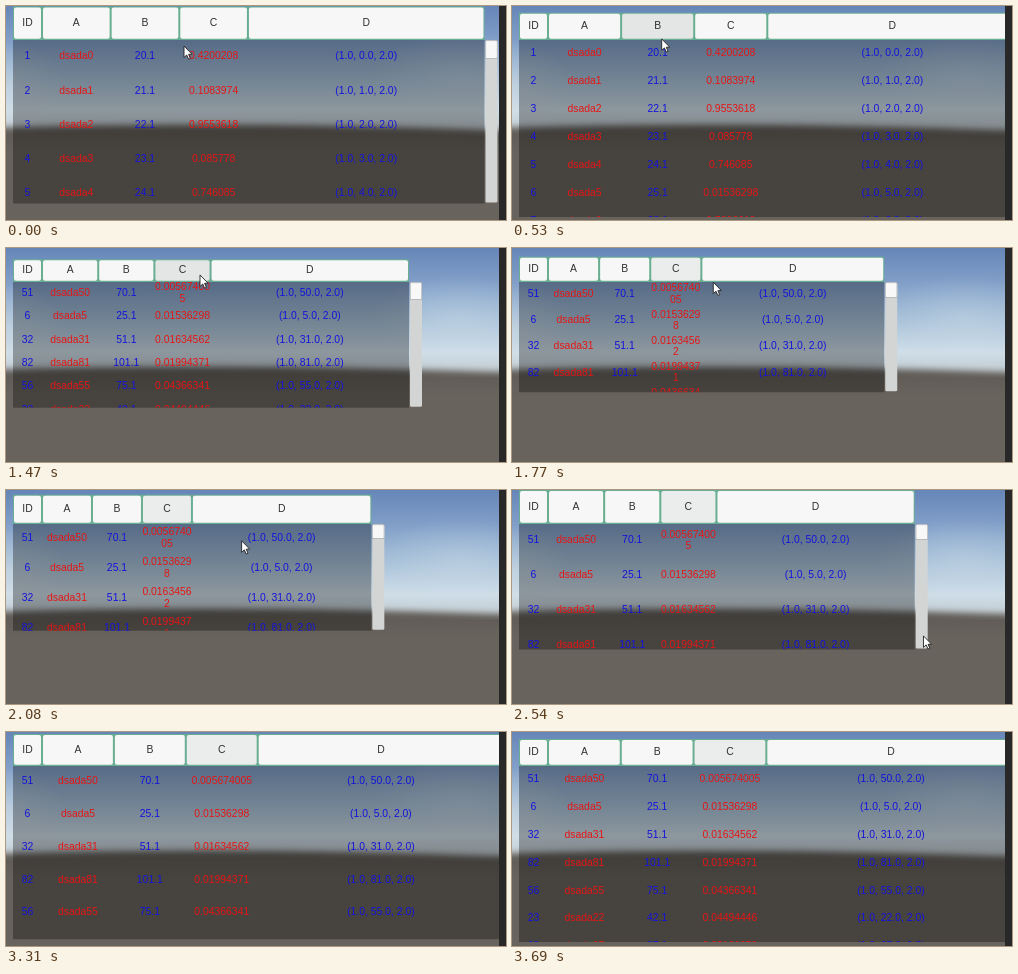
These frames come from a looping animation (500x214 px, 3.84 s). An HTML page with a canvas:

```html
<!DOCTYPE html>
<html>
<head>
<meta charset="utf-8">
<style>
  html, body { margin: 0; width: 100%; height: 100%; overflow: hidden; background: #282828; }
  canvas { display: block; }
</style>
</head>
<body>
<canvas id="stage" width="500" height="214"></canvas>
<script>
const ctx = document.getElementById('stage').getContext('2d');
const LOOP = 3840, STEP = 1000 / 13, LAST_STEP = 48, SORT_AT = 1240;
const LEFT = 7, TOP = 34, VIEW_WIDTH = 493, FONT_SIZE = 10.4;
const RED = '#e51616', BLUE = '#1414dc';
const HEADERS = ['ID', 'A', 'B', 'C', 'D'];

const makeRow = (index, value) => [
  [`${index + 1}`, BLUE],
  [`dsada${index}`, RED],
  [`${20 + index}.1`, BLUE],
  [value, RED],
  [`(1.0, ${index}.0, 2.0)`, BLUE]
];

const unsorted = ['0.4200208', '0.1083974', '0.9553618', '0.085778', '0.746085',
  '0.01536298', '0.7006612', '0.3127409'].map((value, i) => makeRow(i, value));

const sorted = [[50, '0.005674005'], [5, '0.01536298'], [31, '0.01634562'], [81, '0.01994371'],
  [55, '0.04366341'], [22, '0.04494446'], [67, '0.05120873']].map(args => makeRow(...args));

// time, x, y of the pointer tip
const pointerPath = [[0, 178, 40], [530, 149, 33], [1080, 194, 25], [1470, 194, 27], [1800, 202, 35],
  [2080, 236, 51], [2400, 358, 112], [2690, 470, 183], [2920, 483, 193], [3150, 493, 222]];

function pointerAt(ms) {
  const next = pointerPath.findIndex(point => point[0] > ms);
  if (next < 0) return pointerPath.at(-1).slice(1);
  const [t0, x0, y0] = pointerPath[next - 1], [t1, x1, y1] = pointerPath[next];
  const u = (ms - t0) / (t1 - t0);
  return [x0 + (x1 - x0) * u, y0 + (y1 - y0) * u];
}

function fillBox(x, y, w, h, color, radius = 0) {
  ctx.fillStyle = color;
  ctx.beginPath();
  ctx.roundRect(x, y, w, h, radius);
  ctx.fill();
}

function clipTo(x, y, w, h) {
  ctx.save();
  ctx.beginPath();
  ctx.rect(x, y, w, h);
  ctx.clip();
}

function glow(x, y, rx, ry, color) {
  ctx.save();
  ctx.translate(x, y);
  ctx.scale(rx, ry);
  const fade = ctx.createRadialGradient(0, 0, 0, 0, 0, 1);
  fade.addColorStop(0, `rgba(${color},.4)`);
  fade.addColorStop(1, `rgba(${color},0)`);
  fillBox(-1, -1, 2, 2, fade);
  ctx.restore();
}

function drawScenery() {
  const sky = ctx.createLinearGradient(0, 0, 0, 130);
  [[0, '#6686b8'], [.27, '#819fc8'], [.55, '#a6c0d8'], [.8, '#cfdee8'], [1, '#bfc7cb']]
    .forEach(stop => sky.addColorStop(...stop));
  fillBox(0, 0, VIEW_WIDTH, 130, sky);
  glow(455, 72, 90, 45, '205,220,232');
  glow(0, 80, 60, 45, '215,222,228');

  const ground = ctx.createLinearGradient(0, 118, 0, 214);
  ground.addColorStop(0, '#5d5954');
  ground.addColorStop(.3, '#69635d');
  ground.addColorStop(1, '#69635d');
  ctx.save();
  ctx.filter = 'blur(3px)';
  ctx.fillStyle = ground;
  ctx.beginPath();
  ctx.moveTo(-20, 122);
  ctx.quadraticCurveTo(220, 114, 520, 125);
  ctx.lineTo(520, 240);
  ctx.lineTo(-20, 240);
  ctx.fill();
  ctx.restore();
}

function wrap(text, width) {
  const lines = [''];
  for (const char of text) {
    const line = lines.at(-1) + char;
    if (ctx.measureText(line).width > width) lines.push(char);
    else lines[lines.length - 1] = line;
  }
  return lines;
}

function drawPointer(x, y) {
  ctx.beginPath();
  [[0, 0], [0, 11.5], [2.7, 9], [4.6, 13.2], [6.4, 12.4], [4.6, 8.4], [8, 8.2]]
    .forEach(([dx, dy]) => ctx.lineTo(x + dx, y + dy));
  ctx.closePath();
  ctx.fillStyle = '#fff';
  ctx.fill();
  ctx.lineWidth = .9;
  ctx.strokeStyle = '#222';
  ctx.stroke();
}

function draw(ms) {
  const s = ms / 1000;
  const right = 435.5 + 71 * Math.sin(2.03 * s + .65);
  const rowHeight = 29.25 + 6.5 * Math.sin(2 * s + 2.25);
  const height = right / 2 - 75.8;
  const columnWidth = .165 * right - 10.3;
  const edges = [LEFT, ...[0, 1, 2, 3].map(i => 36 + i * columnWidth), right];
  const center = i => (edges[i] + edges[i + 1]) / 2;
  const isSorted = ms >= SORT_AT;
  const [px, py] = pointerAt(ms);

  fillBox(0, 0, 500, 214, '#282828');
  clipTo(0, 0, VIEW_WIDTH, 214);
  drawScenery();
  ctx.font = `${FONT_SIZE}px "Liberation Sans", Arial, sans-serif`;
  ctx.textAlign = 'center';
  ctx.textBaseline = 'middle';

  fillBox(LEFT, TOP, right - LEFT, height, 'rgba(0,0,0,.32)');
  const headHeight = rowHeight - .8, headTop = TOP - headHeight;
  fillBox(LEFT, headTop, right - LEFT, headHeight, '#69ae93');
  HEADERS.forEach((label, i) => {
    const hovered = py < TOP && px > edges[i] && px < edges[i + 1];
    const color = hovered ? '#e4e6e5' : isSorted && i === 3 ? '#ebedec' : '#f6f7f6';
    fillBox(edges[i] + 1, headTop + 1, edges[i + 1] - edges[i] - 2, headHeight - 2.2, color, 2);
    ctx.fillStyle = '#323232';
    ctx.fillText(label, center(i), TOP - headHeight / 2 - .3);
  });

  clipTo(LEFT, TOP, right - LEFT, height);
  (isSorted ? sorted : unsorted).forEach((row, r) => {
    const y = TOP + rowHeight * (r + .5) - .8;
    row.forEach(([text, color], i) => {
      const lines = wrap(text, edges[i + 1] - edges[i] - .5);
      ctx.fillStyle = color;
      lines.forEach((line, n) => ctx.fillText(line, center(i), y + (n - (lines.length - 1) / 2) * 11.5));
    });
  });
  ctx.restore();

  const handle = 10 + height * height / (100 * rowHeight);
  fillBox(right + 1, TOP + .5, 12, height - 1.5, '#d3d4d4', 1.5);
  fillBox(right + 1, TOP + .5, 12, handle, '#f8f8f8', 1.5);
  ctx.strokeStyle = '#a8a8a8';
  ctx.lineWidth = .6;
  ctx.strokeRect(right + 1.3, TOP + .8, 11.4, handle);

  drawPointer(px, py);
  ctx.restore();
}

function tick() {
  const step = Math.floor((performance.now() % LOOP + 9) / STEP);
  draw(Math.min(step, LAST_STEP) * STEP);
  requestAnimationFrame(tick);
}
tick();
</script>
</body>
</html>
```
